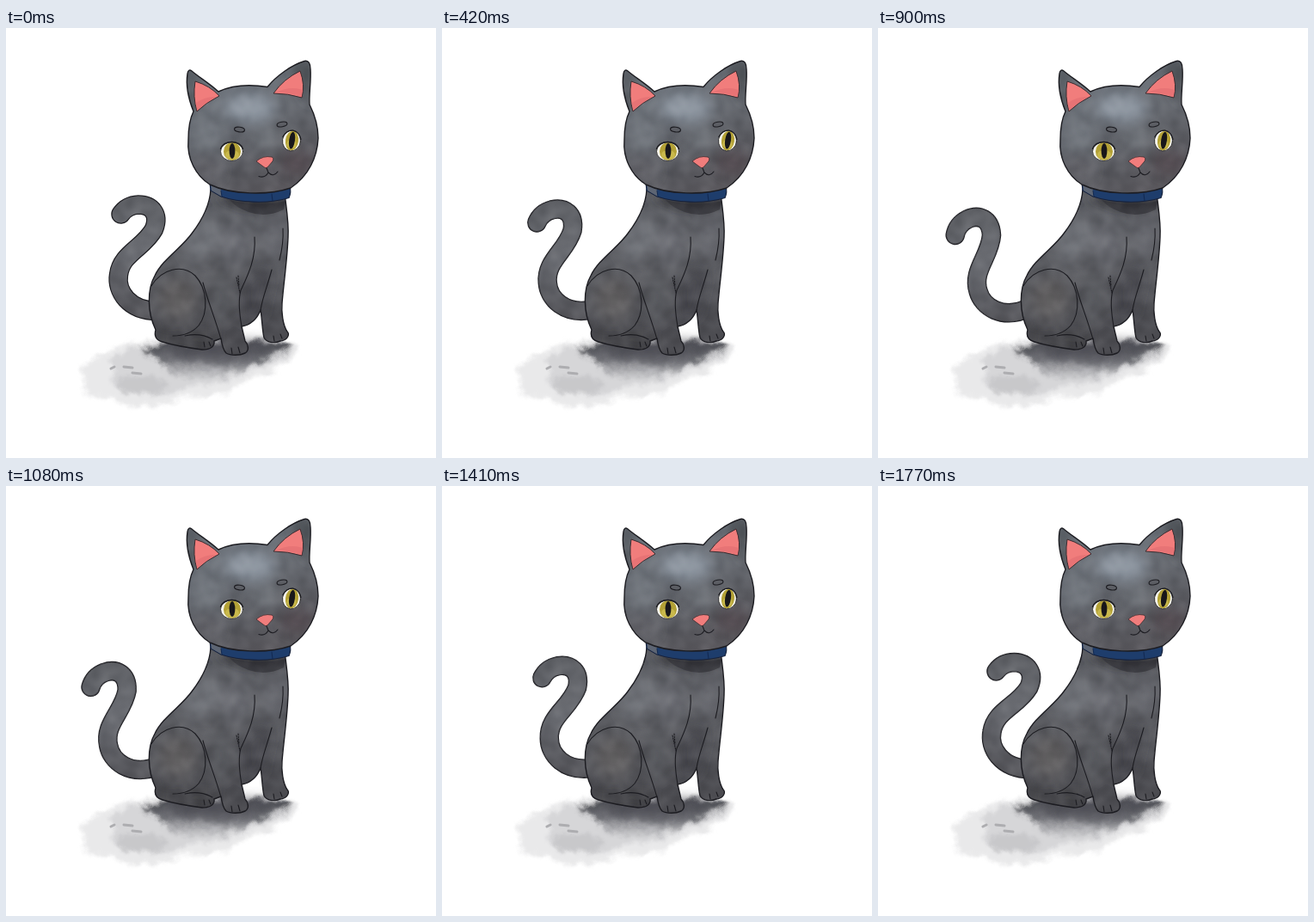
Recreate the animation shown at these times as an HTML page. Size 500 by 500 pixels, loop 1.8 s.

```html
<!DOCTYPE html>
<html lang="en">
<head>
<meta charset="utf-8">
<title>Cat wagging its tail</title>
<style>
  html, body { margin: 0; width: 100%; height: 100%; overflow: hidden; background: #fff; }
  svg { display: block; width: 100vw; height: 100vh; }
  .line { fill: none; stroke: #1c1c21; stroke-width: 1.4; stroke-linecap: round; stroke-linejoin: round; }
  .thin { stroke-width: 1.1; }
  .soft { filter: url(#blur); }
</style>
</head>
<body>
<svg viewBox="0 0 500 500">
  <defs>
    <filter id="blur" x="-60%" y="-60%" width="220%" height="220%"><feGaussianBlur stdDeviation="7"/></filter>
    <!-- faint watercolour mottling over whatever is painted -->
    <filter id="wash" filterUnits="userSpaceOnUse" x="60" y="20" width="320" height="380" color-interpolation-filters="sRGB">
      <feTurbulence type="fractalNoise" baseFrequency=".05" numOctaves="2" seed="8"/>
      <feColorMatrix values=".3 0 0 0 .36  .3 0 0 0 .36  .3 0 0 0 .36  0 0 0 0 1" result="noise"/>
      <feBlend in="noise" in2="SourceGraphic" mode="soft-light"/>
      <feComposite in2="SourceAlpha" operator="in"/>
    </filter>
    <filter id="rough" filterUnits="userSpaceOnUse" x="60" y="330" width="310" height="130">
      <feTurbulence type="fractalNoise" baseFrequency=".06" numOctaves="3" seed="3" result="n"/>
      <feGaussianBlur in="SourceGraphic" stdDeviation="2.5"/>
      <feDisplacementMap in2="n" scale="14" xChannelSelector="R" yChannelSelector="G"/>
    </filter>
    <linearGradient id="tailFill" gradientUnits="userSpaceOnUse" x1="160" y1="195" x2="140" y2="335">
      <stop stop-color="#5c5e63"/><stop offset=".5" stop-color="#696b71"/><stop offset="1" stop-color="#525257"/>
    </linearGradient>
    <linearGradient id="bodyFill" gradientUnits="userSpaceOnUse" x1="230" y1="200" x2="245" y2="375">
      <stop stop-color="#5e6066"/><stop offset=".5" stop-color="#5a5b60"/><stop offset="1" stop-color="#49494e"/>
    </linearGradient>
    <linearGradient id="headFill" gradientUnits="userSpaceOnUse" x1="255" y1="70" x2="310" y2="195">
      <stop stop-color="#6a7078"/><stop offset=".55" stop-color="#5f6167"/><stop offset="1" stop-color="#545257"/>
    </linearGradient>
    <linearGradient id="shade" gradientUnits="userSpaceOnUse" x1="0" y1="368" x2="0" y2="412">
      <stop stop-color="#4b4c52"/><stop offset=".45" stop-color="#77787d"/><stop offset="1" stop-color="#c4c4c7" stop-opacity=".3"/>
    </linearGradient>

    <path id="tail" d="M178 329C142 330 128 305 131 287C134 262 160 256 172 234C179 216 169 205.500 154 205.500C144 206 138 210 133.500 216.500"/>
    <path id="body" d="M238 188C237 206 229 222 216 239C204 256 182 269 173 288C164 304 164 330 174 351C172 358 175 363 182 365C195 369 213 372 228 374C238 374 243 370 242 364L250 361C251 368 252 374 256 378C261 381 272 381 278 378C283 375 282 368 278 364L274 347C285 345 292 338 296 328C298 341 298 352 300 360C303 366 312 367 319 364C328 363 330 356 327 353C322 346 320 330 321 320C323 295 327 270 328 243C329 226 326 210 324 192Z"/>
    <path id="head" d="M218 97C212 82 209 66 211 53Q212 47 216 50C224 57 236 64 247 74C266 65 288 66 304 68.500C314 56 332 43 347 38.500C352 37 354 42 354 48C355 62 352 78 353 89C359 101 363 112 363 128C362 150 352 172 331 186C305 195 262 194 237 182C221 172 210 152 212 130C212 115 214 105 218 97Z"/>
    <clipPath id="inBody"><use href="#body"/></clipPath>
    <clipPath id="inHead"><use href="#head"/></clipPath>
  </defs>

  <!-- ground shadow -->
  <g filter="url(#rough)">
    <path fill="#e9e9ea" d="M88 393C110 376 145 364 180 362L325 366C345 368 345 380 333 384C315 390 313 400 304 408C288 404 274 409 266 418C250 430 225 430 205 428C195 440 150 441 132 437C120 427 100 432 88 424C98 414 84 406 88 393Z"/>
    <path fill="#d6d6d8" d="M118 388C150 368 180 362 235 368L335 370C335 380 312 386 300 394C270 398 255 418 215 416C195 428 150 430 128 420C112 408 140 402 118 388Z"/>
    <ellipse cx="158" cy="415" rx="30" ry="10" fill="#c8c8ca"/>
    <path fill="url(#shade)" d="M152 372L200 364L330 366Q336 374 310 382Q286 392 262 402Q225 414 190 402Q182 386 152 372Z"/>
  </g>
  <path class="soft" fill="#4d4e54" opacity=".75" d="M178 366Q250 360 318 366Q306 376 280 382Q230 388 200 382Z"/>
  <path class="line" style="stroke:#adadb0;stroke-width:3" d="M122 396l4 -2M137 394l10 1M147 401l10 1"/>

  <g id="wag" fill="none" stroke-linecap="round">
    <use href="#tail" stroke="#1c1c21" stroke-width="22.500"/>
    <use href="#tail" stroke="url(#tailFill)" stroke-width="20" filter="url(#wash)"/>
  </g>

  <!-- body -->
  <g filter="url(#wash)"><g clip-path="url(#inBody)">
    <use href="#body" fill="url(#bodyFill)"/>
    <g class="soft">
      <ellipse cx="228" cy="246" rx="18" ry="26" fill="#6f7278" transform="rotate(35 228 246)"/>
      <ellipse cx="265" cy="252" rx="16" ry="24" fill="#696b71"/>
      <ellipse cx="311" cy="242" rx="10" ry="26" fill="#696b71"/>
      <ellipse cx="200" cy="315" rx="22" ry="24" fill="#615e61"/>
      <ellipse cx="250" cy="312" rx="10" ry="30" fill="#595a5f"/>
      <path fill="#3e3e43" d="M274 300L294 275L309 285L298 335L276 347Z" opacity=".75"/>
      <path fill="#404045" d="M176 350L245 350L244 378L176 370Z" opacity=".7"/>
      <path fill="#2e2e33" d="M243 194L326 194L326 209Q296 221 243 199Z"/>
    </g>
    <path fill="#303035" opacity=".7" d="M260 200Q295 209 325 201L323 211Q303 221 282 214Q268 209 260 200Z"/>
  </g></g>
  <use href="#body" class="line"/>
  <g class="line thin">
    <path d="M169 300C181 280 205 274 220 288C234 303 236 330 224 346C216 355 205 358 194 358"/>
    <path d="M208 358Q226 354 240 362M229 296C234 316 243 337 250 362M274 347C271 330 270 316 273 305C281 288 291 268 289 243"/>
    <path d="M296 328C298 314 304 300 309 281M322 233Q323 250 318 270"/>
    <path d="M230 365l1 6M236 365l2 5M262 372l1 7M270 371l2 7M311 358l1 6M319 356l2 5"/>
    <path stroke-dasharray="1.500 1.500" d="M268 290L272 308M270 288L271 300"/>
  </g>

  <!-- collar -->
  <path fill="#1e3d6c" stroke="#17223c" stroke-width="1.200" d="M237 180L330 184Q332 191 329 197.500C305 205 271 203 250 196L238 189Z"/>
  <path fill="#5d6573" d="M238 181L250 187L251 196L239 189Z"/>
  <path class="line thin" style="stroke:#132a52" d="M250 189L251 196M309 193L310 201"/>

  <!-- head -->
  <g filter="url(#wash)"><g clip-path="url(#inHead)">
    <use href="#head" fill="url(#headFill)"/>
    <g class="soft">
      <ellipse cx="284" cy="93" rx="30" ry="18" fill="#8a939d"/>
      <ellipse cx="236" cy="122" rx="17" ry="20" fill="#6f747b"/>
      <ellipse cx="300" cy="126" rx="15" ry="16" fill="#6a6e75"/>
      <ellipse cx="338" cy="157" rx="20" ry="15" fill="#554e52"/>
      <ellipse cx="232" cy="165" rx="18" ry="14" fill="#5f5f65"/>
      <path fill="#47484d" d="M205 45L225 55L225 98L211 98ZM330 35L360 35L360 90L346 82Z" opacity=".6"/>
    </g>
  </g></g>
  <use href="#head" class="line"/>
  <g fill="#f17d7c" stroke="#3a2c30" stroke-width="1">
    <path d="M220 62Q217 80 222 97Q232 87 248 79Q237 67 220 62Z"/>
    <path d="M342 50Q323 59 311 76Q328 76 344 81Q348 66 342 50Z"/>
    <path stroke-width=".8" d="M291 155Q299 148 309 150Q312 151 310 155L304 162Q302 164 299 161Z"/>
  </g>
  <g fill="#dc686d" opacity=".45">
    <path d="M221 87L222 96Q232 87 245 80Q232 79 221 87Z"/>
    <path d="M314 75Q330 75 344 80L345 72Q330 67 314 75Z"/>
  </g>
  <g fill="#5c5e64" stroke="#1c1c21" stroke-width="1.100">
    <ellipse cx="271.500" cy="118" rx="6" ry="2.800" transform="rotate(8 271 118)"/>
    <ellipse cx="321" cy="112" rx="6" ry="2.800" transform="rotate(-10 321 112)"/>
  </g>

  <g id="eyes"></g>
  <path class="line thin" d="M303 163L305 168Q301 175 294 172.500M305 168Q311 174 316 167"/>
</svg>
<script>
  const $ = id => document.getElementById(id);

  const eye = (x, y, rx, ry, tilt) => `
    <g transform="translate(${x} ${y}) rotate(${tilt})">
      <ellipse rx="${rx}" ry="${ry}" fill="#f6f5ec"/>
      <ellipse cx=".5" rx="${rx - 3}" ry="${ry - 0.5}" fill="#b3a136"/>
      <ellipse cx=".5" cy="4" rx="${rx - 5}" ry="5.500" fill="#c9b94c"/>
      <ellipse cx=".5" cy="-.5" rx="3.400" ry="${ry - 2}" fill="#18171a"/>
      <ellipse class="line" style="stroke-width:.8" rx="${rx}" ry="${ry}"/>
      <path class="line" d="M${-rx} -3Q${-rx + 3} ${-ry + 0.5} 0 ${-ry}Q${rx - 3} ${-ry + 0.5} ${rx} -3"/>
    </g>`;
  $('eyes').innerHTML = eye(262.5, 143.5, 13, 11, 0) + eye(332, 131, 10.5, 12, 8);

  const LOOP = 1800, STEP = 30, TURN = 870, END = 1770;
  const FAR = -25.3, BACK = 2;

  function swing(t) {
    return t < TURN ? FAR * t / TURN : FAR + (BACK - FAR) * (t - TURN) / (END - TURN);
  }

  const start = performance.now();
  function draw() {
    const t = Math.floor((performance.now() - start) % LOOP / STEP) * STEP;
    $('wag').setAttribute('transform', `rotate(${swing(t)} 168 330)`);
    requestAnimationFrame(draw);
  }
  draw();
</script>
</body>
</html>
```
